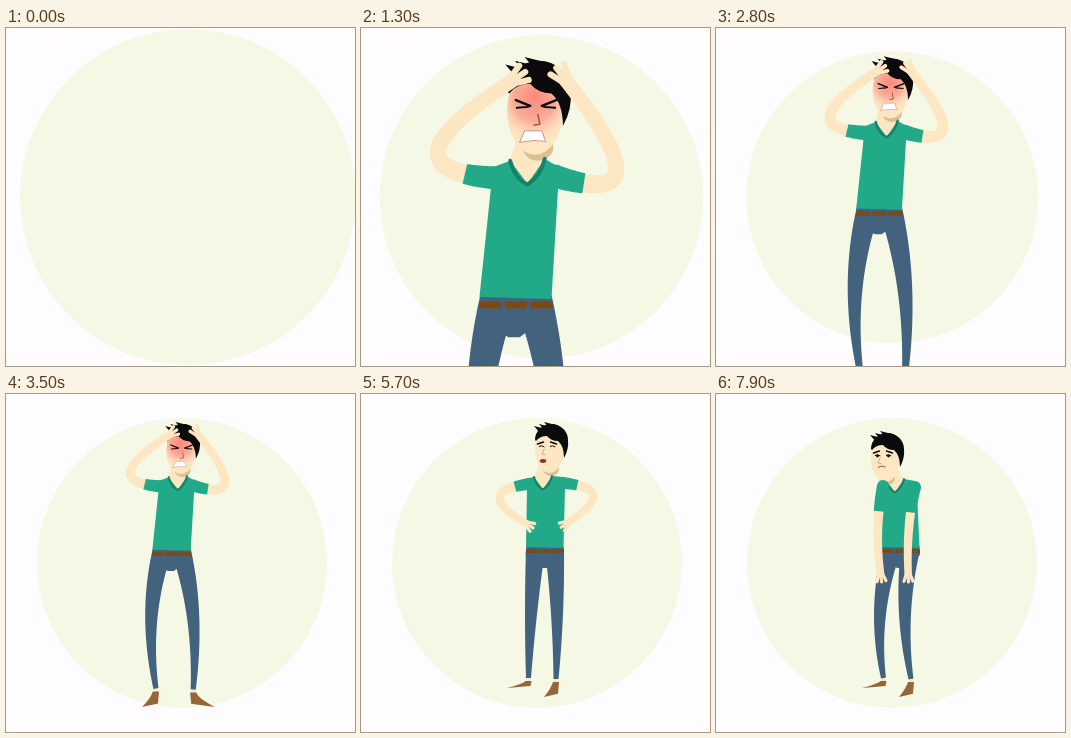
Animation, 349 px wide and 338 px high, one loop 8 s. Source, as an HTML page with a canvas:

```html
<!DOCTYPE html>
<html lang="en">
<head>
<meta charset="utf-8">
<title>Worried man</title>
<style>
  html, body { margin: 0; width: 100%; height: 100%; overflow: hidden; background: #fefcff; }
  canvas { display: block; width: 349px; height: 338px; }
</style>
</head>
<body>
<canvas id="stage"></canvas>
<script>
const W = 349, H = 338, LOOP = 8000, STEP = 100;
const SKIN = '#fde6c2', SHADE = '#dcc08f', SHIRT = '#22aa88', COLLAR = '#168069',
      JEANS = '#42627d', LEATHER = '#7b4a18', SHOE = '#966638', HAIR = '#0b0a0c';

const canvas = document.getElementById('stage');
const ratio = window.devicePixelRatio || 1;
canvas.width = W * ratio;
canvas.height = H * ratio;
const ctx = canvas.getContext('2d');
ctx.scale(ratio, ratio);
ctx.lineCap = ctx.lineJoin = 'round';

// A pose is a skeleton of joints; every outline is derived from it.
const anguish = {
  head: [176, 55], neck: [172, 82], waist: [166, 153], sleeve: [0.15],
  shoulderL: [155, 91], elbowL: [125.5, 77], handL: [160, 43],
  shoulderR: [186, 90], elbowR: [218, 88], handR: [195, 44],
  kneeL: [146, 220], ankleL: [150.5, 291], toeL: [137, 306],
  kneeR: [187, 220], ankleR: [187, 292], toeR: [208, 306]
};
const handsOnHips = {
  head: [189, 55], neck: [182, 83], waist: [184, 153], sleeve: [0.15],
  shoulderL: [168, 90], elbowL: [139, 103], handL: [161, 127],
  shoulderR: [202, 89], elbowR: [232, 101], handR: [211, 126],
  kneeL: [170, 220], ankleL: [167.5, 286], toeL: [146, 293],
  kneeR: [196, 220], ankleR: [195, 287], toeR: [183, 302]
};
const slump = {
  ...handsOnHips,
  head: [170, 64], neck: [179, 86], waist: [185, 153], sleeve: [0.32],
  shoulderL: [167, 92], elbowL: [162, 132], handL: [164, 175],
  shoulderR: [199, 93], elbowR: [193, 133], handR: [192, 175],
  kneeL: [164, 220], kneeR: [189, 220]
};

const clamp = v => Math.min(1, Math.max(0, v));
const progress = (t, from, to) => clamp((t - from) / (to - from));
const ease = p => 0.5 - 0.5 * Math.cos(Math.PI * p);
const mix = (a, b, p) => a + (b - a) * p;

function blend(a, b, p) {
  const pose = {};
  for (const joint in a) pose[joint] = a[joint].map((v, i) => mix(v, b[joint][i], p));
  return pose;
}

function trace(points) {
  ctx.beginPath();
  for (const [x, y] of points) ctx.lineTo(x, y);
}
function fillShape(points, color) {
  trace(points);
  ctx.fillStyle = color;
  ctx.fill();
}
function line(points, color, width) {
  trace(points);
  ctx.strokeStyle = color;
  ctx.lineWidth = width;
  ctx.stroke();
}
function ellipse(x, y, rx, ry, color) {
  ctx.beginPath();
  ctx.ellipse(x, y, rx, ry, 0, 0, 2 * Math.PI);
  ctx.fillStyle = color;
  ctx.fill();
}

// Control point of the quadratic curve that passes through mid halfway.
const control = (a, mid, b) => mid.map((v, i) => 2 * v - (a[i] + b[i]) / 2);

// Tapered tube along the curve a - mid - b, drawn up to the share `end`.
function limb(a, mid, b, startWidth, endWidth, color, end = 1) {
  const c = control(a, mid, b), left = [], right = [], count = 20;
  for (let i = 0; i <= count; i++) {
    const p = end * i / count, q = 1 - p;
    const [x, y] = a.map((v, k) => q * q * v + 2 * q * p * c[k] + p * p * b[k]);
    const [dx, dy] = a.map((v, k) => q * (c[k] - v) + p * (b[k] - c[k]));
    const scale = mix(startWidth, endWidth, i / count) / 2 / Math.hypot(dx, dy);
    left.push([x - dy * scale, y + dx * scale]);
    right.unshift([x + dy * scale, y - dx * scale]);
  }
  fillShape([...left, ...right], color);
}

function drawShoe([x, y], [toeX, toeY]) {
  const side = Math.sign(toeX - x);
  line([[x, y - 3], [x, y + 2]], SKIN, 4);
  ctx.beginPath();
  ctx.moveTo(x - 3 * side, y + 1);
  ctx.lineTo(x - 2 * side, mix(y, toeY, 0.85));
  ctx.lineTo(toeX, toeY + 1);
  ctx.quadraticCurveTo(x + 5 * side, mix(y, toeY, 0.5), x + 3 * side, y + 1);
  ctx.fillStyle = SHOE;
  ctx.fill();
}

function drawLegs(pose) {
  const [x, y] = pose.waist;
  for (const [side, offset] of [['L', -9.5], ['R', 9.5]]) {
    const [ankleX, ankleY] = pose['ankle' + side];
    drawShoe([ankleX, ankleY], pose['toe' + side]);
    limb([x + offset, y + 2], pose['knee' + side], [ankleX, ankleY - 2], 19, 5, JEANS);
  }
  fillShape([[x - 18.5, y - 1], [x + 18.5, y - 1], [x + 19, y + 8],
             [x + 2, y + 21], [x - 4, y + 21], [x - 19.5, y + 8]], JEANS);
  ctx.fillStyle = LEATHER;
  for (let i = 0; i < 3; i++) ctx.fillRect(x - 19 + i * 13.3, y + 2.3, 11.4, 3.6);
}

function drawTorso({ head, neck, waist, shoulderL, shoulderR }) {
  const [x, y] = neck, at = ([px, py], dx, dy) => [px + dx, py + dy];
  fillShape([at(neck, -9, 0), at(shoulderL, 0, -6), at(shoulderL, -2, 5), at(waist, -19, 0),
             at(waist, 18.5, 1), at(shoulderR, 2, 5), at(shoulderR, 0, -6), at(neck, 9, -1)], SHIRT);
  fillShape([at(head, -9, 12), at(head, 10, 10), at(neck, 9, -1), at(neck, 0, 12), at(neck, -9, 0)], SKIN);
  ellipse(head[0] + 1, head[1] + 20, 8, 7, SHADE);
  ctx.beginPath();
  ctx.moveTo(x - 9, y);
  ctx.quadraticCurveTo(x - 7, y + 9, x, y + 12.5);
  ctx.quadraticCurveTo(x + 7, y + 8, x + 9, y - 1);
  ctx.strokeStyle = COLLAR;
  ctx.lineWidth = 2;
  ctx.stroke();
}

function drawArm(shoulder, elbow, hand, sleeve) {
  limb(shoulder, elbow, hand, 10, 7.5, SKIN);
  const c = control(shoulder, elbow, hand);
  const angle = Math.atan2(hand[1] - c[1], hand[0] - c[0]);
  const reach = (length, turn = 0) =>
    [hand[0] + length * Math.cos(angle + turn), hand[1] + length * Math.sin(angle + turn)];
  line([hand, reach(5)], SKIN, 7.5);
  for (const turn of [-0.35, 0, 0.35]) line([hand, reach(13, turn)], SKIN, 3.2);
  ellipse(...shoulder, 6, 6, SHIRT);
  limb(shoulder, elbow, hand, 12, 10.5, SHIRT, sleeve);
}

function drawAngryFace() {
  for (const side of [-1, 1]) {
    line([[side * 10.5, -4.5], [side * 3, -1.5]], HAIR, 1.3);
    line([[side * 10, -0.5], [side * 4, -1]], HAIR, 1);
  }
  line([[1, 3], [2, 8], [-1, 8.5]], '#a3544a', 0.8);
  const mouth = [[-8.5, 17.5], [-6, 11.5], [3, 11.5], [5, 17], [-1, 16.5], [-8.5, 17.5]];
  fillShape(mouth, '#fff');
  line(mouth, '#e08a7c', 0.5);
}

function drawSadFace(mood) {
  for (const side of [-1, 1]) {
    const x = -3 + side * 5.5;
    line([[x - side * 2, -7], [x + side * 4, -5]], HAIR, 1.4);
    line([[x - 2.5, -2.5], [x, -3.2], [x + 2.5, -2.2]], HAIR, 1);
    if (mood === 'frown') ellipse(x, -2, 1.4, 1.4, HAIR);
  }
  line([[-6, 0], [-8, 5], [-5, 5.5]], '#c99b76', 0.8);
  if (mood === 'groan') ellipse(-7, 12, 3.2, 1.9, '#8c332d');
  if (mood === 'sigh') ellipse(-5, 9.5, 1.4, 1.7, '#5b2a25');
  if (mood === 'frown') line([[-8, 9.5], [-4.5, 8], [-1, 9]], '#7d4438', 0.9);
}

function drawHead([x, y], mood, flush) {
  ctx.save();
  ctx.translate(x, y);
  ellipse(-0.5, 1, 14.5, 23, SKIN);
  const glow = ctx.createRadialGradient(-1, -6, 1, -1, -3, 21);
  glow.addColorStop(0, `rgba(250,138,124,${flush})`);
  glow.addColorStop(0.5, `rgba(251,158,140,${flush * 0.8})`);
  glow.addColorStop(1, 'rgba(253,230,194,0)');
  ellipse(-0.5, 1, 14.5, 23, glow);

  // Cap of hair with a fringe and one sideburn, then tufts leaning left.
  ctx.beginPath();
  ctx.ellipse(1.5, -9, 16.5, 16, 0, Math.PI, 2 * Math.PI);
  ctx.quadraticCurveTo(19, 0, 14, 9);
  ctx.quadraticCurveTo(14, -3, 8, -8);
  ctx.quadraticCurveTo(1, -8, -3, -13);
  ctx.quadraticCurveTo(-10, -13, -14, -8);
  ctx.fillStyle = HAIR;
  ctx.fill();
  for (let i = 0; i < 3; i++) {
    const rootX = -10 + i * 5, rootY = -19 - i * 2;
    fillShape([[rootX, rootY + 3], [rootX - 6, rootY - 4], [rootX + 6, rootY - 1]], HAIR);
  }

  if (mood === 'angry') drawAngryFace();
  else drawSadFace(mood);
  ctx.restore();
}

function poseAt(t) {
  const settle = ease(progress(t, 4850, 5500));
  const drop = ease(progress(t, 5750, 6350));
  const pose = drop > 0 ? blend(handsOnHips, slump, drop) : blend(anguish, handsOnHips, settle);

  // Elbows swing outwards while the arms fall.
  const swing = 14 * Math.sin(Math.PI * drop);
  pose.elbowL[0] -= swing;
  pose.elbowR[0] += swing;

  // Trembling while clutching the head, slow breathing afterwards.
  const breath = drop * Math.sin((t - 6400) / 480);
  pose.head[0] += 0.5 * (1 - settle) * Math.sin(t / 95) - 0.7 * breath;
  pose.head[1] += 0.5 * breath;
  return { pose, flush: 1 - settle };
}

function moodAt(t) {
  if (t < 5100) return 'angry';
  if (t < 6100) return 'groan';
  return t < 6900 ? 'sigh' : 'frown';
}

function draw(t) {
  ctx.fillStyle = '#fefcff';
  ctx.fillRect(0, 0, W, H);

  const pull = 1 - ease(progress(t, 300, 3200));
  const radius = 145 + 23 * pull;
  ellipse(176 + 6 * pull, 169, radius, radius, '#f5f8e5');
  if (t < 400) return;

  const zoom = 1 + 1.1 * (1 - ease(progress(t, 400, 3800)));
  const rise = H * (1 - progress(t, 300, 800)) ** 3;
  const { pose, flush } = poseAt(t);
  ctx.save();
  ctx.translate(178, 27 + rise);
  ctx.scale(zoom, zoom);
  ctx.translate(-178, -27);
  drawLegs(pose);
  drawTorso(pose);
  drawHead(pose.head, moodAt(t), flush);
  for (const side of 'LR') {
    drawArm(pose['shoulder' + side], pose['elbow' + side], pose['hand' + side], pose.sleeve[0]);
  }
  ctx.restore();
}

const start = performance.now();
function tick() {
  const t = (performance.now() - start) % LOOP;
  draw(Math.floor(t / STEP) * STEP);
  requestAnimationFrame(tick);
}
tick();
</script>
</body>
</html>
```
